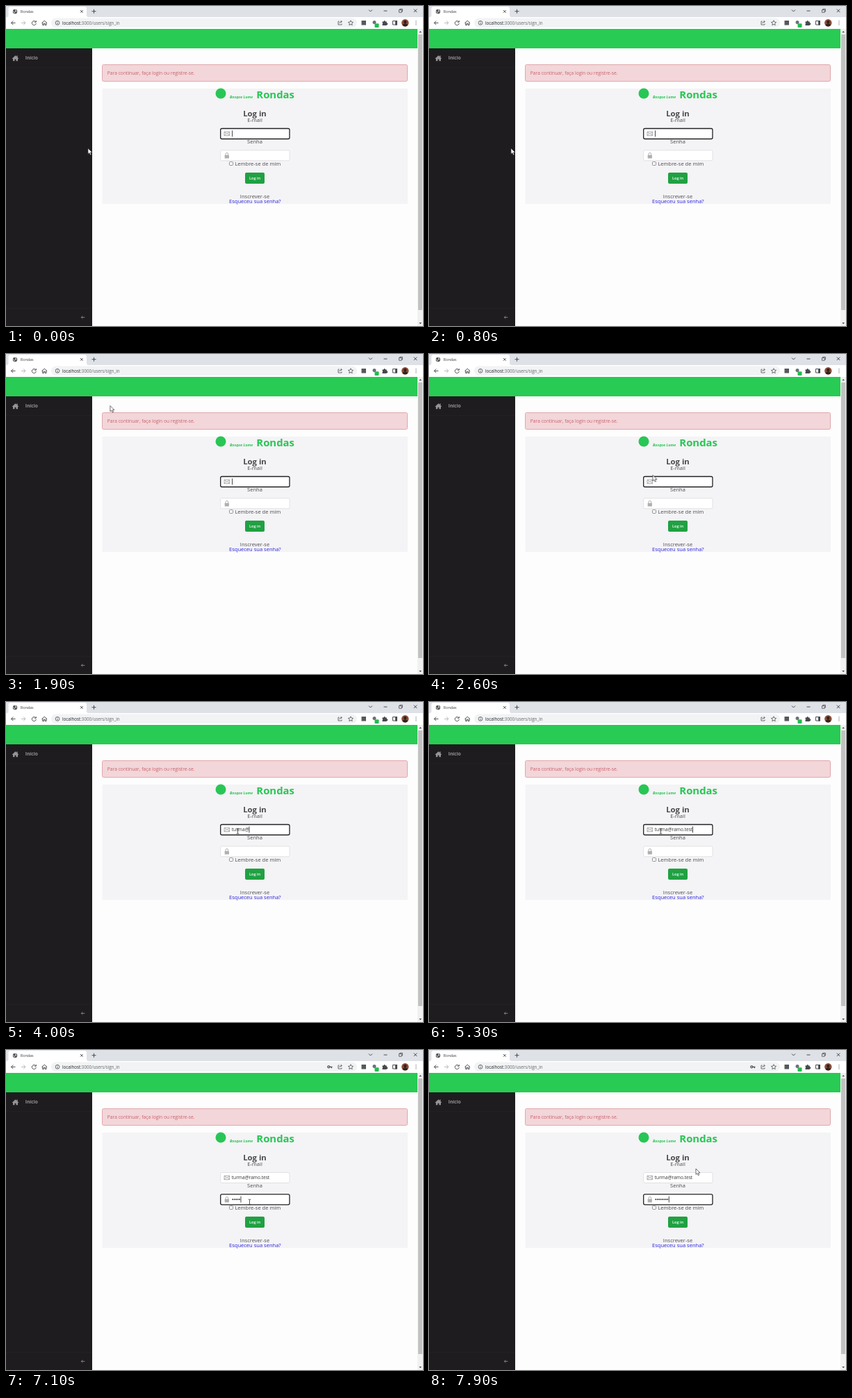
An HTML page for the animation above (8000 ms loop, 600x461 px).

```html
<!DOCTYPE html>
<html lang="pt">
<head>
<meta charset="utf-8">
<title>Login</title>
<style>
  html, body { margin: 0; width: 100%; height: 100%; overflow: hidden; background: #fefdfe; }
  svg { display: block; width: 600px; height: 461px; font-family: "Open Sans", "Noto Sans", sans-serif; }
  .line { fill: none; stroke: #4b4d51; stroke-width: 1; }
  .thin { stroke-width: .8; }
  .form { font-size: 7.55px; fill: #4c4a4d; }
  .mid { text-anchor: middle; }
  .bold { font-weight: 700; }
  .typed { font-size: 6.6px; fill: #333; }
</style>
</head>
<body>
<svg viewBox="0 0 600 461">
  <!-- tab strip -->
  <rect width="600" height="16" fill="#dee1e6"/>
  <path d="M1 16Q3.500 16 3.500 13V4Q3.500 1 6.500 1H113Q116 1 116 4V13Q116 16 119 16Z" fill="#fff"/>
  <circle cx="13" cy="8" r="3.200" fill="#505357"/>
  <path d="M10.500 7.500L12 9V10.500M13 5.500L14.500 6.500L13.500 8H15" fill="none" stroke="#fff" stroke-width=".9"/>
  <text x="20.800" y="10" font-size="5.400" fill="#33363a">Rondas</text>
  <path class="line" d="M107 6l3.600 3.600m0-3.600L107 9.600M123.500 7.700h6M126.500 4.700v6M522 5.500l2.500 2.500L527 5.500M543.500 7h5M586.800 4.500l4.500 4.500m0-4.500L586.800 9"/>
  <path class="line thin" d="M565.500 5.500h3.700v3.700h-3.700zM566.700 5.500V4.300h3.700V8h-1.200"/>

  <!-- toolbar -->
  <rect y="16" width="600" height="17" fill="#fff"/>
  <rect x="65" y="17.500" width="440" height="13.500" rx="6.750" fill="#f1f3f4"/>
  <path class="line" d="M13.500 24.300H7.500m2.800-2.800l-2.800 2.800l2.800 2.800"/>
  <path class="line" style="stroke:#b5b7ba" d="M22 24.300h6m-2.800-2.800l2.800 2.800l-2.800 2.800"/>
  <path class="line" d="M42.500 22.500A3 3 0 1 0 43.300 25M43.300 21v2.200H41"/>
  <path class="line" d="M51.500 24.500l3.800-3.300l3.800 3.300M52.700 24v3.500h1.700v-2.300h1.800v2.300H58V24"/>
  <circle class="line thin" cx="74" cy="24.300" r="2.900"/>
  <path class="line thin" d="M74 22.300v.8m0 .8v2.300"/>
  <text x="81" y="26.500" font-size="6.250" fill="#63666a"><tspan fill="#222428">localhost</tspan>:3000/users/sign_in</text>
  <g id="key">
    <circle class="line" cx="464.300" cy="24.300" r="1.500" style="stroke-width:1.300"/>
    <path class="line" style="stroke-width:1.300" d="M465.800 24.300h3.700m-1.200 0v1.900"/>
  </g>
  <path class="line thin" d="M479.500 22h-1.500v5h5v-1.500M479.700 25q.3-2.500 3.500-2.500m-1.500-1.500l1.700 1.500l-1.700 1.500"/>
  <path class="line thin" d="M496 20.800l1.100 2.300l2.500.3l-1.900 1.700l.5 2.500l-2.200-1.300l-2.200 1.300l.5-2.500l-1.900-1.700l2.500-.3z"/>
  <rect x="511.500" y="21" width="6.500" height="6.500" fill="#55585c"/>
  <circle cx="530" cy="23.500" r="2.500" fill="#697078"/>
  <rect x="530.500" y="25.300" width="6" height="5.700" rx="1" fill="#25ba50"/>
  <path d="M541.500 22.500h2a1.200 1.200 0 1 1 2.300 0h2v2a1.200 1.200 0 1 1 0 2.300v1.200h-6.300v-1.800a1.200 1.200 0 0 0 0-2z" fill="#45484c"/>
  <path class="line" d="M556.500 21.500h6v5.500h-6z"/>
  <path d="M560 21h3v6.500h-3z" fill="#4b4d51"/>
  <circle cx="574.300" cy="24.300" r="5.200" fill="#8d4d35"/>
  <path d="M570.300 27.600q4-4.500 8 0a5.200 5.200 0 0 1-8 0z" fill="#30201d"/>
  <circle cx="574.300" cy="23" r="2.200" fill="#30201d"/>
  <path d="M590 21.800v.01M590 24.300v.01M590 26.800v.01" stroke="#4b4d51" stroke-width="1.300" stroke-linecap="round"/>

  <!-- page frame -->
  <rect y="33" width="592" height="28" fill="#28cb54"/>
  <rect y="61" width="124" height="400" fill="#1e1c1f"/>
  <path d="M0 88.500h124M0 435.500h124" stroke="#222023"/>
  <path d="M8.500 76l5-4.800l1.800 1.700v-1.300h1.400v2.600l1.800 1.800h-1.500v3.300h-2.500v-2.600h-2v2.600H10V76z" fill="#969497"/>
  <text x="27.700" y="77.400" font-size="6.700" class="bold" fill="#969497">Início</text>
  <path d="M113.300 448.500h-5m2-2l-2 2l2 2" fill="none" stroke="#8b898c" stroke-width=".9"/>
  <rect x="592" y="33" width="8" height="428" fill="#f1f1f1"/>
  <rect x="593" y="41" width="6" height="397" fill="#c1c1c1"/>
  <path d="M594.300 38.300h3.800l-1.900-2.200zM594.300 456h3.800l-1.900 2.200z" fill="#505050"/>

  <!-- alert and login panel -->
  <rect x="138.500" y="84.500" width="439" height="24" rx="2" fill="#f2d6d9" stroke="#e0a8ad"/>
  <text x="145.800" y="98.800" font-size="6.720" fill="#c9616b">Para continuar, faça login ou registre-se.</text>
  <rect x="138.500" y="119" width="439.500" height="166" fill="#f4f3f5"/>
  <circle cx="309" cy="126" r="7.500" fill="#28c655"/>
  <g class="bold" fill="#28c655">
    <text x="322" y="132.500" font-size="5.300" font-style="italic">Bosque Lume</text>
    <text x="360.300" y="132.500" font-size="14.900">Rondas</text>
  </g>
  <text class="mid bold" x="358" y="159.300" font-size="11.300" fill="#4a484b">Log in</text>
  <g class="form">
    <text class="mid" x="358" y="167.200">E-mail</text>
    <text class="mid" x="358" y="198.400">Senha</text>
    <text x="329.400" y="229.700">Lembre-se de mim</text>
    <text class="mid" x="358" y="276.700">Inscrever-se</text>
    <text class="mid" x="358.300" y="284.200" style="fill:#2a25df">Esqueceu sua senha?</text>
  </g>
  <rect x="321.500" y="224.500" width="5" height="5" rx="1" fill="#fff" stroke="#777" stroke-width=".8"/>
  <rect x="344" y="240" width="28" height="16" rx="2" fill="#20a142"/>
  <text class="mid" x="358.100" y="249.900" font-size="5.600" font-weight="600" fill="#fff">Log in</text>

  <rect class="box" x="308.700" y="176.500" width="99.300" height="15" rx="2" fill="#fff"/>
  <rect class="box" x="308.700" y="207.800" width="99.300" height="15" rx="2" fill="#fff"/>
  <path d="M314 181.200h7.600v5.500H314zl3.800 3.200l3.800-3.200M314 186.700l2.700-3m4.900 3l-2.700-3" fill="none" stroke="#98969a" stroke-width=".8"/>
  <rect x="314.700" y="214.700" width="6.200" height="4.800" rx=".6" fill="#b0aeb1"/>
  <path d="M316 215v-1.700a1.800 1.800 0 0 1 3.600 0v1.700" fill="none" stroke="#b0aeb1"/>
  <text class="typed" id="mail" x="324.800" y="186.200"></text>
  <g id="dots" fill="#333"></g>
  <path id="caret" d="M0-4.500v9" stroke="#333" stroke-width=".9"/>

  <!-- pointer -->
  <path id="arrow" d="M0 0v8.300l1.900-1.700l1.300 3l1.500-.7l-1.300-2.900h2.600z" fill="#fff" stroke="#333" stroke-width=".7"/>
  <path id="beam" d="M-1.800-3.800h1.300l.5.500l.5-.5h1.300M0-3.300v6.600M-1.800 3.800h1.300l.5-.5l.5.500h1.300" fill="none" stroke="#333" stroke-width=".8"/>
</svg>
<script>
const LOOP = 8000, BLINK = 530, ADDRESS = "turma@ramo.test";
const MAIL_START = 3300, MAIL_STEP = 110;
const FOCUS = 5900, PASS_START = 6400, PASS_STEP = 125, PASS_LENGTH = 8;
// pointer stops: time, x, y
const PATH = [
  [0, 118, 205], [900, 118, 205], [1600, 142, 70], [1800, 142, 70],
  [2600, 322, 174.500], [2900, 333.500, 186], [5400, 333.500, 186],
  [5850, 350.500, 219], [7300, 350.500, 219], [7800, 384, 171], [LOOP, 384, 171]
];
const $ = id => document.getElementById(id);
const boxes = document.querySelectorAll(".box");
const [mail, dots, caret, arrow, beam, key] = ["mail", "dots", "caret", "arrow", "beam", "key"].map($);
const show = (el, on) => el.setAttribute("visibility", on ? "visible" : "hidden");
const place = (el, x, y) => el.setAttribute("transform", `translate(${x} ${y})`);
const typedCount = (t, start, step, max) => Math.max(0, Math.min(max, Math.floor((t - start) / step)));

for (let i = 0; i < PASS_LENGTH; i++)
  dots.innerHTML += `<circle cx="${326.200 + i * 2.450}" cy="215.300" r=".95"/>`;

function pointerAt(t) {
  const i = PATH.findIndex(stop => stop[0] > t);
  const [t0, x0, y0] = PATH[i - 1], [t1, x1, y1] = PATH[i];
  const u = (t - t0) / (t1 - t0), k = u * u * (3 - 2 * u);
  return [x0 + (x1 - x0) * k, y0 + (y1 - y0) * k];
}

function draw(t) {
  const [x, y] = pointerAt(t);
  const overField = x > 309 && x < 408 && (y > 176 && y < 192 || y > 207 && y < 223);
  show(arrow, !overField);
  show(beam, overField);
  place(arrow, x, y);
  place(beam, x, y);

  const letters = typedCount(t, MAIL_START, MAIL_STEP, ADDRESS.length);
  const hidden = typedCount(t, PASS_START, PASS_STEP, PASS_LENGTH);
  mail.textContent = ADDRESS.slice(0, letters);
  [...dots.children].forEach((dot, i) => show(dot, i < hidden));
  show(key, hidden > 0);

  const active = t < FOCUS ? 0 : 1;
  boxes.forEach((box, i) => {
    box.setAttribute("stroke", i === active ? "#222226" : "#dcdadd");
    box.setAttribute("stroke-width", i === active ? 1.300 : .8);
  });

  // each click or key press restarts the blink
  let since = t + 525;
  if (t >= 2950) since = t - 2950;
  if (letters) since = t - MAIL_START - letters * MAIL_STEP;
  if (active) since = t - FOCUS;
  if (hidden) since = t - PASS_START - hidden * PASS_STEP;
  show(caret, since % (2 * BLINK) < BLINK);
  const end = active ? (hidden ? 325.700 + hidden * 2.450 : 325.500)
    : (letters ? 325.100 + mail.getComputedTextLength() : 325.500);
  place(caret, end, active ? 215.200 : 183.800);
}

function frame() {
  draw(performance.now() % LOOP);
  requestAnimationFrame(frame);
}
frame();
</script>
</body>
</html>
```
